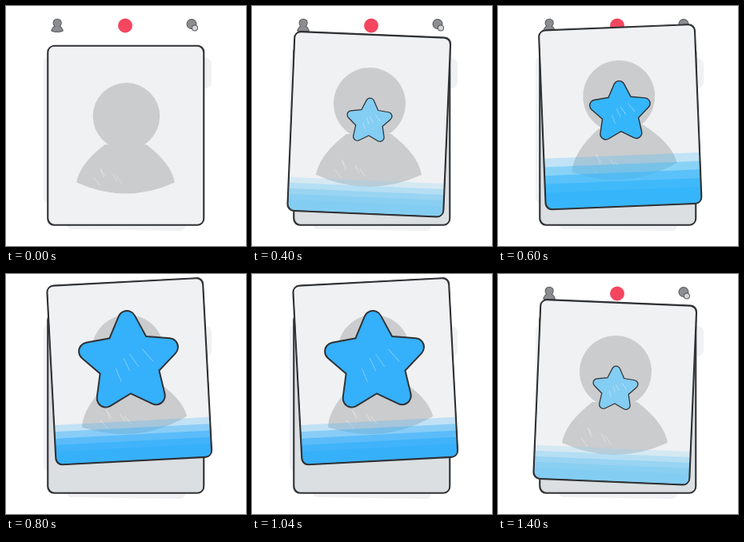
Write an HTML page with a canvas that moves like this. It is 300 by 300 pixels and loops after 1600 ms.

```html
<!DOCTYPE html>
<html lang="en">
<head>
<meta charset="utf-8">
<title>Super star swipe</title>
<style>
html, body { margin: 0; width: 100%; height: 100%; overflow: hidden; background: #fff; }
canvas { display: block; }
</style>
</head>
<body>
<canvas id="stage" width="300" height="300"></canvas>
<script>
const ctx = document.getElementById('stage').getContext('2d');
const INK = '#2f3134', PAPER = '#f0f1f3', GREY = '#cbccce', ICON = '#8b8d90';
const WIDTH = 195, HEIGHT = 224, STEP = 200;

// Card centre and angle in degrees; star radius; top of the blue wash on the card
const rest = { x: 149.5, y: 162, angle: 0, lean: 0, size: 0.93 };
const small = { x: 146, y: 148, angle: 2.4, lean: 0, size: 1, star: 24, wash: 70, blue: '#84cdf3' };
const medium = { x: 152.5, y: 139, angle: -2.3, lean: -5, size: 1, star: 32.5, wash: 48, blue: '#35b6fb' };
const large = { x: 154, y: 122, angle: -3, lean: -6, size: 1, star: 53.5, wash: 62, blue: '#35b0fb' };
const LOOP = [rest, rest, small, medium, large, large, medium, small];

let seed;
function random(min, max) {
  seed = (seed * 16807) % 2147483647;
  return min + (max - min) * seed / 2147483647;
}

function fill(color, path) {
  ctx.beginPath();
  path();
  ctx.fillStyle = color;
  ctx.fill();
}

function stroke(color, width, path) {
  ctx.beginPath();
  path();
  ctx.strokeStyle = color;
  ctx.lineWidth = width;
  ctx.lineCap = ctx.lineJoin = 'round';
  ctx.stroke();
}

function line(color, width, x0, y0, x1, y1) {
  stroke(color, width, () => {
    ctx.moveTo(x0, y0);
    ctx.lineTo(x1, y1);
  });
}

// Runs draw in a frame moved to x, y, turned by degrees and scaled
function place(x, y, degrees, scale, draw) {
  ctx.save();
  ctx.translate(x, y);
  ctx.rotate(degrees * Math.PI / 180);
  ctx.scale(scale, scale);
  draw();
  ctx.restore();
}

function circle(x, y, r) {
  ctx.arc(x, y, r, 0, 2 * Math.PI);
}

function cardPath(shift = 0) {
  ctx.roundRect(shift - WIDTH / 2, -shift - HEIGHT / 2, WIDTH, HEIGHT, 8);
}

// Two slightly misaligned lines give the pencil weight
function outlineCard() {
  stroke(INK, 1.6, () => cardPath());
  stroke(INK, 1.2, () => cardPath(0.7));
}

function shoulders() {
  ctx.moveTo(-28, 12);
  ctx.quadraticCurveTo(-62, 38, -66, 63);
  ctx.quadraticCurveTo(0, 93, 66, 63);
  ctx.quadraticCurveTo(62, 38, 28, 12);
  ctx.closePath();
}

function head() {
  circle(1, -26, 45);
}

function drawPerson(color) {
  fill(color, head);
  fill(color, shoulders);
}

function drawIcons() {
  place(64, 24, 0, 0.105, () => {
    stroke('#4b4d50', 16, head);
    stroke('#4b4d50', 16, shoulders);
    drawPerson(ICON);
  });
  fill('#f4465f', () => circle(149, 24.5, 9));
  const bubble = (color, x, y, r) => {
    fill('#55575a', () => circle(x, y, r));
    fill(color, () => circle(x, y, r - 1));
  };
  bubble(ICON, 232, 22.5, 6.5);
  bubble('#d5d6d8', 236, 27.5, 4);
}

function drawSmudges() {
  line(PAPER, 14, 54, 70, 54, 240);
  line(PAPER, 16, 249, 73, 249, 95);
  line(PAPER, 12, 82, 273, 218, 275);
}

// Layers of the same blue, each starting lower and covering more
function drawWash({ wash, blue }) {
  const bottom = HEIGHT / 2, layers = 5;
  ctx.save();
  ctx.beginPath();
  cardPath();
  ctx.clip();
  for (let i = 0; i < layers; i++) {
    const y = wash + (bottom - wash) * i / (layers + 1);
    ctx.globalAlpha = 0.25 + 0.15 * i;
    fill(blue, () => ctx.rect(-WIDTH / 2, y, WIDTH, bottom - y));
  }
  ctx.restore();
}

function drawStar({ star: r, blue }) {
  const path = () => {
    for (let i = 0; i < 10; i++) {
      const a = i * Math.PI / 5, d = i % 2 ? r * 0.49 : r;
      ctx.lineTo(d * Math.sin(a), -d * Math.cos(a));
    }
    ctx.closePath();
  };
  const rim = r * 0.38;
  place(0.5, 2.5 - 0.26 * r, 0, 1, () => {
    stroke(INK, rim + 1.2 + r * 0.05, path);
    stroke(blue, rim, path);
    fill(blue, path);
  });
}

function drawScratches(count, y, spreadX, spreadY, length) {
  for (let i = 0; i < count; i++) {
    const x0 = random(-spreadX, spreadX), y0 = y + random(-spreadY, spreadY);
    line('rgba(255,255,255,.35)', 1, x0, y0, x0 + random(0.3, 0.8) * length, y0 + length);
  }
}

function drawFace(pose) {
  fill(PAPER, () => cardPath());
  place(0, 0, pose.lean - pose.angle, pose.size, () => {
    drawPerson(GREY);
    drawScratches(5, 52, 42, 8, 10);
  });
  if (pose.star) drawWash(pose);
  outlineCard();
  if (pose.star) {
    drawStar(pose);
    drawScratches(4, -0.3 * pose.star, 0.4 * pose.star, 0.25 * pose.star, 0.3 * pose.star);
  }
}

function drawPose(pose) {
  seed = 29;
  ctx.fillStyle = '#fff';
  ctx.fillRect(0, 0, 300, 300);
  drawSmudges();
  drawIcons();
  if (pose !== rest) {
    place(rest.x, rest.y, 0, 1, () => {
      fill('#dcdfe1', () => cardPath());
      outlineCard();
    });
  }
  place(pose.x, pose.y, pose.angle, 1, () => drawFace(pose));
}

const start = performance.now();
function tick() {
  const step = Math.floor((performance.now() - start) / STEP);
  drawPose(LOOP[step % LOOP.length]);
  requestAnimationFrame(tick);
}
tick();
</script>
</body>
</html>
```
